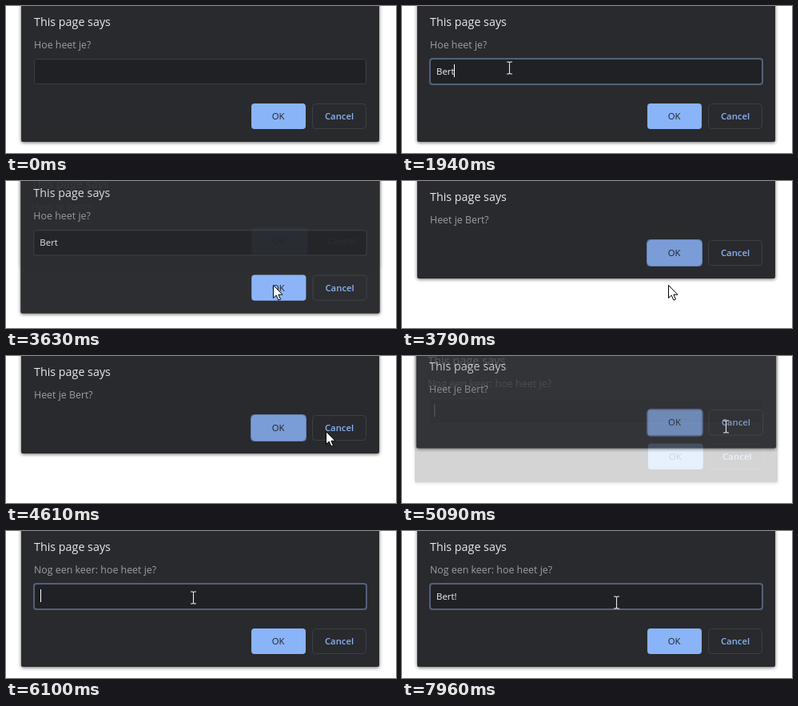
Animation of 488 by 184 pixels, one loop 8 s. Source, as an HTML page:

```html
<!DOCTYPE html>
<html lang="nl">
<head>
<meta charset="utf-8">
<title>Prompt dialogs</title>
<style>
  html, body { margin: 0; width: 100%; height: 100%; overflow: hidden; background: #fff; }
  svg { display: block; width: 488px; height: 184px; }
  text { font-family: "Open Sans", "Noto Sans", sans-serif; white-space: pre; }
  .panel { fill: #292a2d; filter: drop-shadow(0 1px 2px rgba(0, 0, 0, .6)); }
  .title { font-size: 14.3px; fill: #e8eaed; }
  .message { font-size: 12.4px; fill: #9aa0a6; }
  .value { font-size: 11.4px; fill: #f1f3f4; }
  .label { font-size: 11.3px; text-anchor: middle; }
  .field { fill: #202124; stroke: #3c4043; }
  .ring { fill: none; stroke: #52607a; stroke-width: 2; }
  .cancel { fill: none; stroke: #3c4043; }
</style>
</head>
<body>
<svg id="stage" viewBox="0 0 488 184" xmlns="http://www.w3.org/2000/svg"></svg>
<script>
const LOOP = 8000;
const STEP = 77.3;
const START = 220;
const SWITCHES = [3566, 5010];
const NAME = "Bert";
const stage = document.getElementById("stage");

function add(parent, tag, attrs, text) {
  const el = document.createElementNS("http://www.w3.org/2000/svg", tag);
  for (const key in attrs) el.setAttribute(key, attrs[key]);
  if (text) el.textContent = text;
  parent.appendChild(el);
  return el;
}

function box(parent, cls, x, y, width, height, rx) {
  return add(parent, "rect", { class: cls, x, y, width, height, rx });
}

function makeDialog(message, hasField) {
  const g = add(stage, "g", {});
  const dialog = { g };
  const top = hasField ? 122 : 74;
  box(g, "panel", 19, -40, 448, top + 88, 2);
  add(g, "text", { class: "title", x: 35, y: 25 }, "This page says");
  add(g, "text", { class: "message", x: 35, y: 52.5 }, message);
  if (hasField) {
    box(g, "field", 35.5, 66.5, 415, 31, 3);
    dialog.ring = box(g, "ring", 35, 66, 416, 32, 3);
    dialog.value = add(g, "text", { class: "value", x: 43, y: 86 });
    dialog.caret = add(g, "rect", { y: 73, width: 1, height: 16, fill: "#fff" });
  }
  const ok = box(g, "ok", 307, top, 68, 32, 4);
  ok.setAttribute("fill", hasField ? "#8ab4f8" : "#7a9dd8");
  if (!hasField) {
    const edge = box(g, "edge", 306.5, top - .5, 69, 33, 4);
    edge.setAttribute("fill", "none");
    edge.setAttribute("stroke", "#6583b8");
  }
  add(g, "text", { class: "label", x: 340.5, y: top + 20, fill: "#202124" }, "OK");
  box(g, "cancel", 383.5, top + .5, 67, 31, 4);
  add(g, "text", { class: "label", x: 417, y: top + 20, fill: "#8ab4f8", "font-weight": 600 }, "Cancel");
  return dialog;
}

const dialogs = [
  makeDialog("Hoe heet je?", true),
  makeDialog("Heet je " + NAME + "?", false),
  makeDialog("Nog een keer: hoe heet je?", true)
];

const arrow = add(stage, "path", {
  d: "M0 0V16L3.7 12.6L6.4 18.6L9 17.5L6.4 11.7H11.4Z",
  fill: "#fff", stroke: "#000", "stroke-width": 1
});
const beam = add(stage, "path", {
  d: "M-3.5 -7.5H-1L0 -6.5L1 -7.5H3.5M0 -6.5V6.5M-3.5 7.5H-1L0 6.5L1 7.5H3.5",
  fill: "none", stroke: "#e8e8e8", "stroke-width": 1.1
});

// time, x, y
const path = [
  [220, 186, 160], [770, 134, 77], [2783, 134, 77], [3400, 334, 130],
  [3690, 334, 130], [3776, 333, 130], [3930, 333, 130], [4700, 408, 90],
  [5010, 405, 88], [5090, 405, 88], [5322, 396, 87], [5708, 225, 82],
  [5786, 225, 82], [5863, 234, 83], [7873, 234, 83], [7940, 268, 89]
];

const clamp = v => Math.max(0, Math.min(1, v));
const smooth = v => { v = clamp(v); return v * v * (3 - 2 * v); };
const within = (t, spans) => spans.some(([a, b]) => t >= a && t < b);
const show = (el, on) => el.setAttribute("visibility", on ? "inherit" : "hidden");

function cursorAt(t) {
  let i = 0;
  while (i < path.length - 2 && t >= path[i + 1][0]) i++;
  const [a, x0, y0] = path[i];
  const [b, x1, y1] = path[i + 1];
  const k = smooth((t - a) / (b - a));
  return [x0 + (x1 - x0) * k, y0 + (y1 - y0) * k];
}

function place(dialog, alpha, dy, scale) {
  dialog.g.setAttribute("opacity", alpha);
  show(dialog.g, alpha > 0);
  dialog.g.setAttribute("transform",
    `translate(${243 * (1 - scale)} ${dy}) scale(${scale})`);
}

function setField(dialog, text, focused, caretOn) {
  if (dialog.value.textContent !== text) dialog.value.textContent = text;
  const width = text ? dialog.value.getComputedTextLength() : 0;
  dialog.caret.setAttribute("x", Math.round(43 + width));
  show(dialog.ring, focused);
  show(dialog.caret, caretOn);
}

const typed = (t, text, times) => text.slice(0, times.filter(v => t >= v).length);

function draw(t) {
  // Motion advances in steps, like a screen recording
  const q = t < START ? 0 : START + Math.floor((t - START) / STEP) * STEP;

  dialogs.forEach((dialog, i) => {
    const since = i ? q - SWITCHES[i - 1] : 1e4;
    const past = i < 2 ? q - SWITCHES[i] : -1;
    if (past > 0) {
      place(dialog, 1 - clamp(past / 200) ** 3, -.088 * past, 1 + .00006 * past);
    } else {
      const k = smooth((since - 30) / 175);
      place(dialog, k, -17.5 * (1 - k), 1 + .017 * (1 - k));
    }
  });

  setField(dialogs[0], typed(t, NAME, [1630, 1700, 1860, 1940]),
    within(t, [[850, 3470]]),
    within(t, [[850, 1390], [1630, 2480], [3010, 3470]]));
  setField(dialogs[2], typed(t, NAME + "!", [6570, 6640, 6800, 6800, 7040]),
    t >= 5240,
    within(t, [[5010, 5550], [6100, 7580]]));

  const [x, y] = cursorAt(q);
  const hasField = q < SWITCHES[0] || q >= SWITCHES[1];
  const overField = hasField && x > 35 && x < 451 && y > 66 && y < 98;
  show(arrow, t >= START && !overField);
  show(beam, t >= START && overField);
  const at = `translate(${Math.round(x) + .5} ${Math.round(y) + .5})`;
  arrow.setAttribute("transform", at);
  beam.setAttribute("transform", at);
}

const begin = performance.now();
function tick() {
  draw((performance.now() - begin) % LOOP);
  requestAnimationFrame(tick);
}
tick();
</script>
</body>
</html>
```
